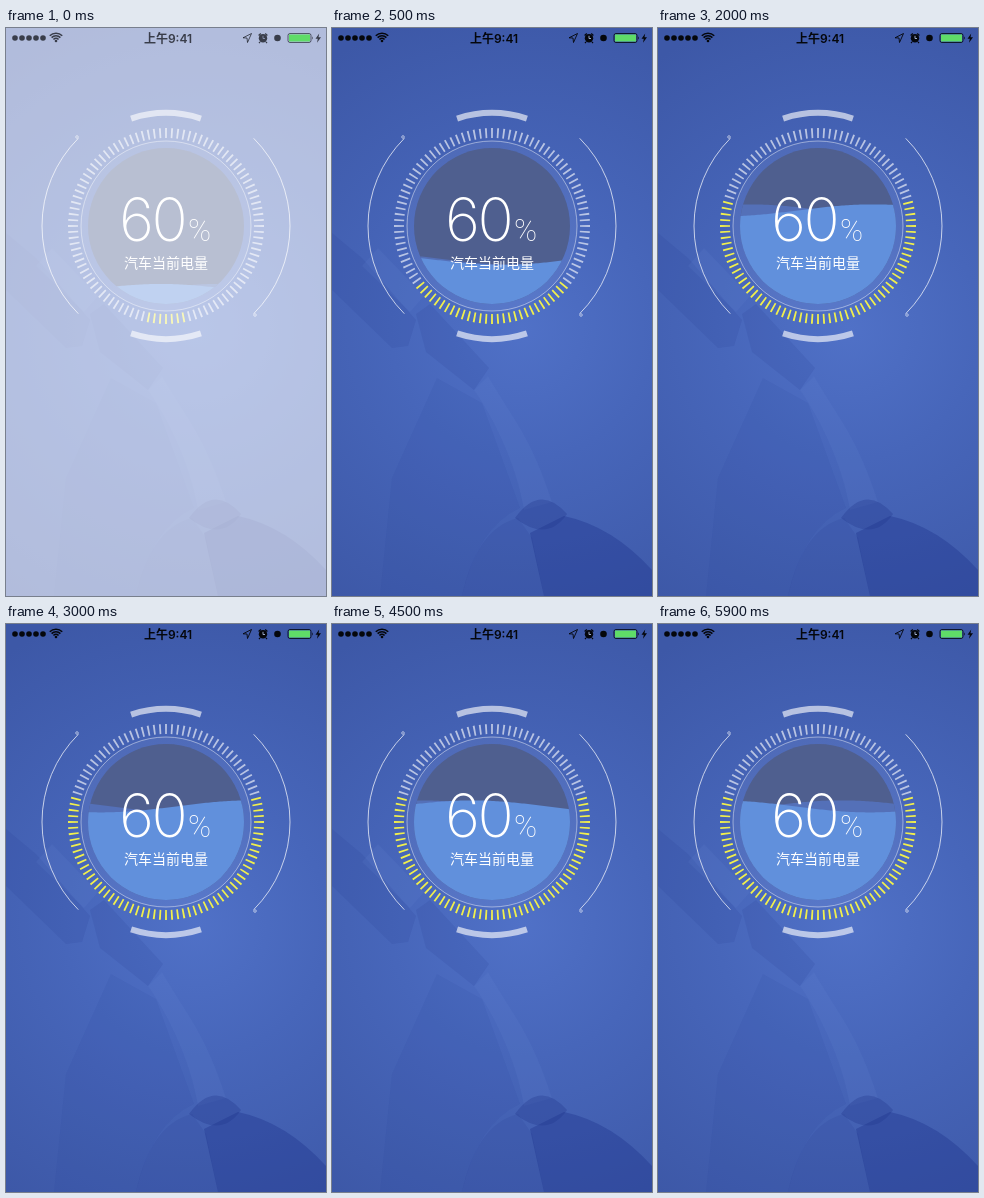
An HTML page with a canvas for the animation above (6 s loop, 320 px wide and 568 px high).

```html
<!DOCTYPE html>
<html lang="zh">
<meta charset="utf-8">
<title>汽车当前电量</title>
<style>
  html, body { margin: 0; width: 100%; height: 100%; overflow: hidden; background: #4461b3; }
  canvas { display: block; }
</style>
<canvas id="stage" width="320" height="568"></canvas>
<script>
const c = document.getElementById('stage').getContext('2d');
const CX = 160, CY = 198, TAU = Math.PI * 2, DEG = Math.PI / 180;
const LOOP = 6000, STEP = 100;
const CJK = '"Noto Sans CJK SC", "Noto Sans CJK", sans-serif';

const white = a => `rgba(255,255,255,${a})`;

function shape(d, color) {
  c.fillStyle = color;
  c.fill(new Path2D(d));
}

function line(d, color, width) {
  c.strokeStyle = color;
  c.lineWidth = width;
  c.stroke(new Path2D(d));
}

function disc(x, y, r, color) {
  c.fillStyle = color;
  c.beginPath();
  c.arc(x, y, r, 0, TAU);
  c.fill();
}

function arc(r, from, to, color, width, x = CX, y = CY) {
  c.strokeStyle = color;
  c.lineWidth = width;
  c.beginPath();
  c.arc(x, y, r, from * DEG, to * DEG);
  c.stroke();
}

function text(str, x, y, font, color, align = 'center', spacing = 0) {
  c.font = font;
  c.fillStyle = color;
  c.textAlign = align;
  c.letterSpacing = spacing + 'px';
  c.fillText(str, x, y);
}

function background() {
  const g = c.createRadialGradient(190, 300, 0, 190, 300, 330);
  g.addColorStop(0, '#5071c7');
  g.addColorStop(0.4, '#4766ba');
  g.addColorStop(1, '#3d58a7');
  c.fillStyle = g;
  c.fillRect(0, 0, 320, 568);
  // soft tones of a charging plug and cable
  const dark = 'rgba(35,60,145,.14)', light = 'rgba(110,140,215,.12)';
  shape('M0 205L30 230L84 292L76 318L60 320L0 262Z', dark);
  shape('M30 238L46 220L92 268L78 284Z', light);
  shape('M84 286L98 276L157 340L142 362L94 324Z', dark);
  shape('M142 362L156 348C180 390 200 410 220 474L192 482C185 440 165 395 142 362Z', light);
  shape('M60 450L105 350L150 375L188 480Q145 500 130 568H48Z', 'rgba(35,60,145,.08)');
  shape('M183 490Q208 455 235 486Q215 515 183 490Z', 'rgba(30,50,135,.3)');
  shape('M130 568Q145 500 186 490L200 510L212 568Z', dark);
  shape('M212 568L198 505L232 488Q280 498 320 542V568Z', 'rgba(30,50,140,.38)');
}

function waterPath(level, crest) {
  c.beginPath();
  c.moveTo(80, 290);
  for (let x = 80; x <= 240; x += 2)
    c.lineTo(x, level - 6 * Math.cos((x - crest) / 300 * TAU));
  c.lineTo(240, 290);
  c.fill();
}

function gauge(t) {
  disc(CX, CY, 85, white(0.06));
  arc(85, 0, 360, white(0.45), 1);

  const lit = Math.min(29, Math.floor(3.2 + 22 * t));
  for (let i = -50; i < 50; i++) {
    const a = 90 + i * 3.6;
    arc(93, a - 0.55, a + 0.55, Math.abs(i) <= lit ? '#f1ef4c' : white(0.62), 10);
  }

  for (const a of [90, 270]) arc(113, a - 18, a + 18, white(0.62), 6);
  for (const a of [0, 180]) arc(124, a - 45, a + 45, white(0.7), 1);
  arc(1.3, 0, 360, white(0.7), 0.8, 71, 109);
  arc(1.3, 0, 360, white(0.7), 0.8, 249, 287);

  c.save();
  c.beginPath();
  c.arc(CX, CY, 78, 0, TAU);
  c.clip();
  c.fillStyle = '#4f5f8f';
  c.fillRect(80, 118, 160, 160);
  const level = 276 - 156 * Math.min(0.6, 0.09 + 0.4 * t);
  c.fillStyle = '#5470b8';
  waterPath(level, 30 - 361 * (t - 3));
  c.fillStyle = '#6190dc';
  waterPath(level, 245 - 270 * (t - 3));
  c.restore();
}

function labels() {
  text('60', 113, 212.5, '200 60px Inter, Roboto, sans-serif', '#fff', 'left', -2.5);
  text('%', 193.5, 212.5, '200 31px Roboto, sans-serif', '#fff');
  text('汽车当前电量', CX, 239.5, '400 14px ' + CJK, '#fff');
}

function statusBar(fade) {
  const ink = '#05070c';
  c.globalAlpha = 1 - fade * 0.5;
  for (let i = 0; i < 5; i++) disc(9 + i * 7, 10, 2.8, ink);
  for (const r of [3.6, 6.2, 8.8]) arc(r, 225, 315, ink, 1.6, 50, 14);
  disc(50, 13, 1.3, ink);
  text('上午9:41', 162, 14.5, '600 12px Inter, ' + CJK, ink);

  line('M237 9.8L245.5 5.5L241.5 14.5L241 10Z', ink, 0.9);
  disc(257, 10.3, 4.2, ink);
  line('M252.6 7.5L254.8 5.5M259.2 5.5L261.4 7.5M254 14L253 15M260 14L261 15', ink, 1.3);
  line('M257 7.8V10.5H259', '#aab8dc', 0.9);
  disc(271.5, 10, 3.3, ink);
  line('M284 5.5H303Q305 5.5 305 7.5V12.5Q305 14.5 303 14.5H284Q282 14.5 282 12.5V7.5Q282 5.5 284 5.5Z', ink, 0.8);
  shape('M306 8.3Q307.6 10 306 11.7Z', ink);
  shape('M313.2 5.5L309.5 10.8H311.8L311 14.8L315 9.3H312.5Z', ink);
  c.globalAlpha = 1;
  c.fillStyle = '#5fdc68';
  c.fillRect(283, 6.5, 21, 7);
}

function draw() {
  const ms = performance.now() % LOOP;
  const t = Math.floor(ms / STEP) * STEP / 1000;
  const fade = Math.max(0, 0.6 * (1 - t / 0.3));
  background();
  gauge(t);
  c.fillStyle = white(fade);
  c.fillRect(0, 0, 320, 568);
  labels();
  statusBar(fade);
  requestAnimationFrame(draw);
}
draw();
</script>
</html>
```
